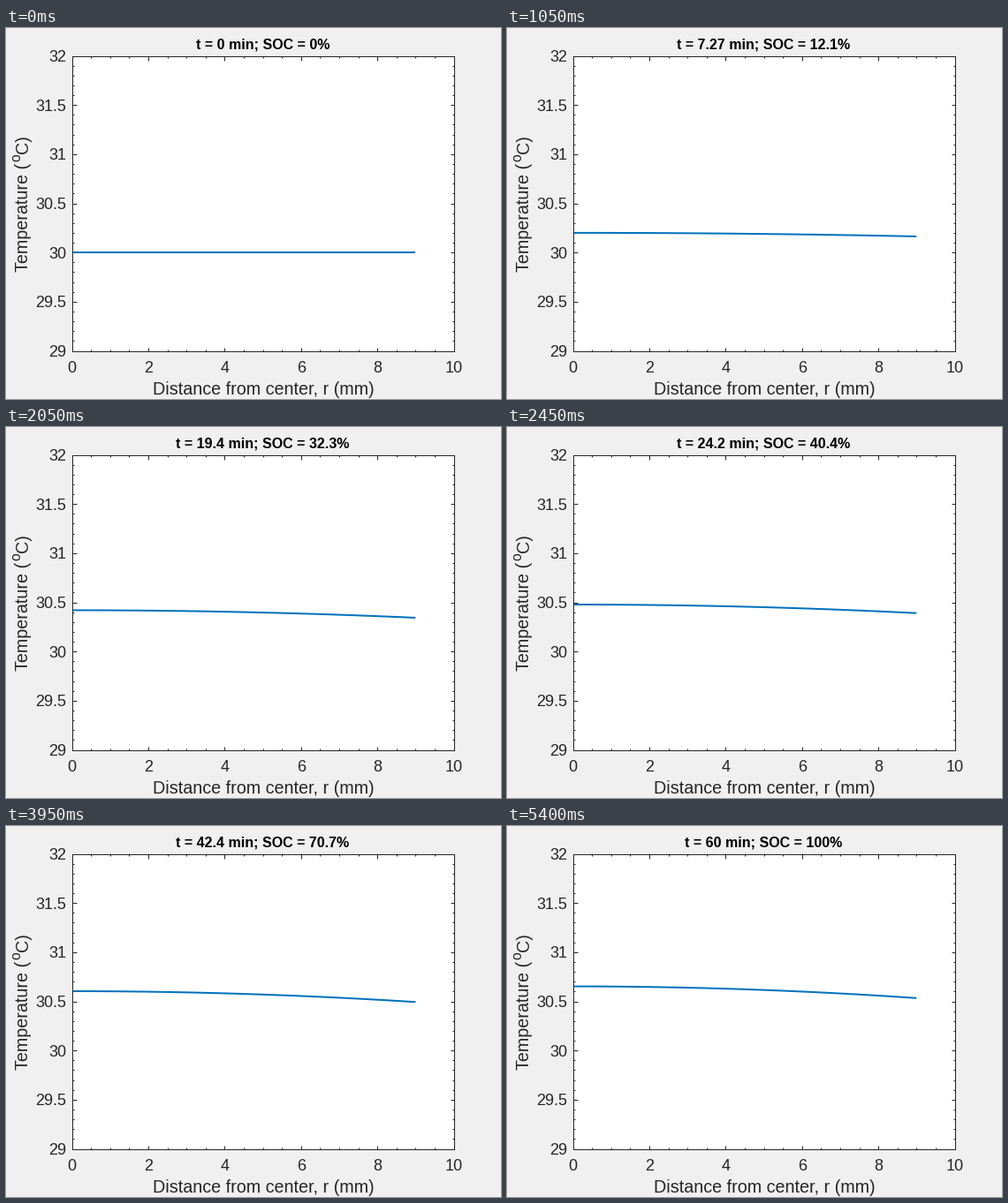
Recreate the animation shown at these times as a matplotlib script. Size 560x420 px, loop 5.45 s.

```python
import numpy as np
import matplotlib.pyplot as plt
from matplotlib.animation import FuncAnimation
from matplotlib.ticker import MultipleLocator

W, H, DPI = 560, 420, 100
PX = 72 / DPI                      # points per pixel
LEFT, RIGHT, TOP, BOTTOM = 74.5, 506.5, 31.5, 365.5
INK = "#262626"
STEP_MS, HOLD, STEPS = 50, 10, 99  # the first state stays for HOLD ticks
MINUTES = 60
RADIUS = 9

plt.rcParams["font.family"] = "Liberation Sans"

fig = plt.figure(figsize=(W / DPI, H / DPI), dpi=DPI, facecolor="#f0f0f0")
ax = fig.add_axes([LEFT / W, 1 - BOTTOM / H,
                   (RIGHT - LEFT) / W, (BOTTOM - TOP) / H])
ax.set(xlim=(0, 10), ylim=(29, 32), facecolor="white")


def put(x, y, text, size, ha="center", color=INK, **kw):
    """Place text with its baseline at pixel (x, y), counted from the top left."""
    return fig.text(x / W, 1 - y / H, text, fontsize=size * PX, ha=ha,
                    va="baseline", color=color, rotation_mode="anchor", **kw)


# Axes box, ticks and tick labels
for axis, major, minor in ((ax.xaxis, 2, 0.5), (ax.yaxis, 0.5, 0.1)):
    axis.set_major_locator(MultipleLocator(major))
    axis.set_minor_locator(MultipleLocator(minor))
ax.tick_params(which="both", direction="in", top=True, right=True,
               labelbottom=False, labelleft=False, color=INK, width=PX)
ax.tick_params(which="major", length=4.5 * PX)
ax.tick_params(which="minor", length=2.3 * PX)
for spine in ax.spines.values():
    spine.set(color=INK, linewidth=PX)

for v in range(0, 11, 2):
    put(LEFT + v * (RIGHT - LEFT) / 10, 390, f"{v}", 18)
for v in np.arange(29, 32.1, 0.5):
    put(68, BOTTOM - (v - 29) * (BOTTOM - TOP) / 3 + 6.5, f"{v:g}", 18, "right")

# Axis labels, with a raised "o" as the degree sign
put(291, 415, "Distance from center, r (mm)", 19.8)
put(25, 276.5, "Temperature (", 19.8, "left", rotation=90)
put(16.5, 151, "o", 15.8, "left", rotation=90)
put(25, 142, "C)", 19.8, "left", rotation=90)

title = put(290.3, 23, "", 16, color="black", weight="bold")
r = np.linspace(0, RADIUS, 60)
line, = ax.plot(r, r * 0 + 30, color="#0072bd", lw=2 * PX,
                solid_capstyle="butt")


def temperature(t):
    """Radial profile warming towards a parabolic steady state."""
    rise = 1 - np.exp(-(t / 20.4) ** 1.03)
    return 30 + rise * (0.56 + 0.125 * (1 - (r / RADIUS) ** 2))


def update(i):
    done = max(0, i - HOLD + 1) / STEPS
    t = MINUTES * done
    line.set_ydata(temperature(t))
    title.set_text(f"t = {t:.3g} min; SOC = {100 * done:.3g}%")
    return line, title


anim = FuncAnimation(fig, update, frames=HOLD + STEPS, interval=STEP_MS,
                     repeat=True, repeat_delay=0, cache_frame_data=False)
plt.show()
```
